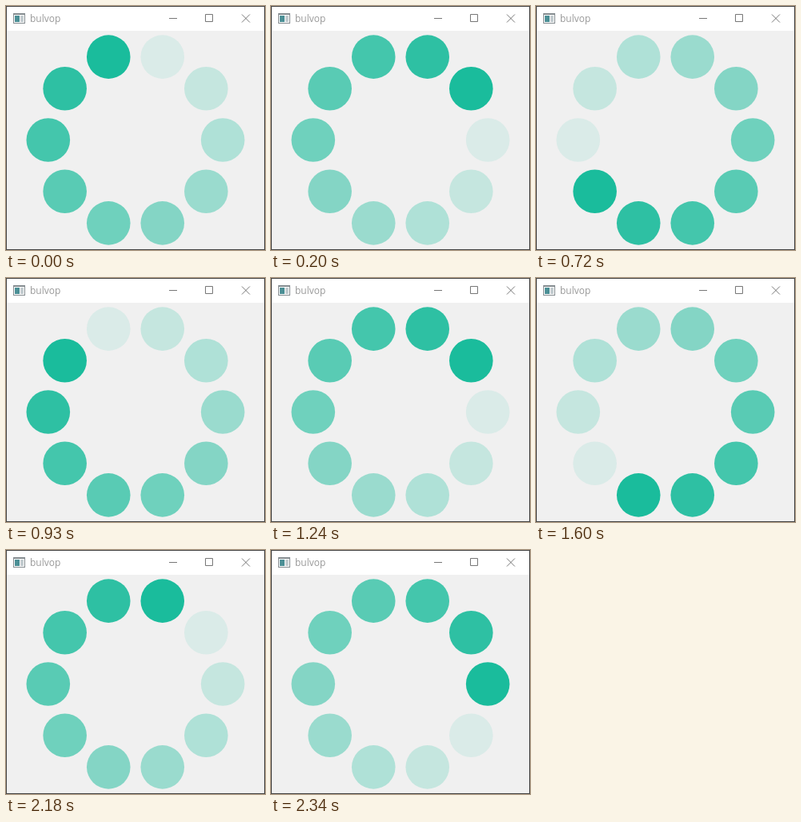
An HTML page for the animation above (2.41 s loop, 324 by 305 pixels).

```html
<!DOCTYPE html>
<html lang="en">
<head>
<meta charset="utf-8">
<title>Loading ring</title>
<style>
  html, body { margin: 0; width: 100%; height: 100%; overflow: hidden; background: #f0f0f0; }
  svg { display: block; width: 324px; height: 305px; }
  text { font: 12px "Open Sans", "Noto Sans", sans-serif; fill: #999; }
  .controls { fill: none; stroke: #777; }
  #ring { fill: #1abc9c; }
</style>
</head>
<body>
<svg viewBox="0 0 324 305">
  <rect width="324" height="305" fill="#444"/>
  <rect x="1" y="1" width="322" height="303" fill="#f0f0f0"/>
  <rect x="1" y="1" width="322" height="30" fill="#fff"/>

  <g shape-rendering="crispEdges">
    <rect x="9" y="9" width="15" height="13" fill="#858c90"/>
    <rect x="10" y="11" width="13" height="10" fill="#fff"/>
    <rect x="11" y="12" width="6" height="8" fill="#4b8f95"/>
    <rect x="18" y="12" width="4" height="8" fill="#c3ccd0"/>
  </g>
  <text x="30" y="20">bulvop</text>

  <g class="controls">
    <path d="M204 15.5h10M249.5 10.5h9v9h-9z"/>
    <path d="M295 10.5l10 10M305 10.5l-10 10"/>
  </g>

  <g id="ring"></g>
</svg>
<script>
  const COUNT = 10, LOOP = 2410, FIRST = 7;
  const CENTER = { x: 162, y: 167.5 }, OUTER = 136.5;
  const DOT = OUTER / 5, RADIUS = OUTER - DOT;
  // Moments (ms) when the brightest dot moves one place clockwise.
  const STEPS = [60, 200, 270, 420, 490, 560, 720, 790, 930, 1000, 1080, 1240,
    1300, 1440, 1520, 1600, 1740, 1810, 1960, 2040, 2180, 2260, 2340];

  const ring = document.getElementById('ring');
  const dots = Array.from({ length: COUNT }, (_, i) => {
    const angle = i * 2 * Math.PI / COUNT;
    const dot = document.createElementNS('http://www.w3.org/2000/svg', 'circle');
    dot.setAttribute('cx', CENTER.x + RADIUS * Math.cos(angle));
    dot.setAttribute('cy', CENTER.y + RADIUS * Math.sin(angle));
    dot.setAttribute('r', DOT);
    return ring.appendChild(dot);
  });

  function draw(time) {
    const head = FIRST + STEPS.filter(t => t <= time).length;
    dots.forEach((dot, i) => {
      const lag = (head - i + COUNT) % COUNT;
      dot.setAttribute('fill-opacity', 1 - lag / COUNT);
    });
  }

  const start = performance.now();
  function tick() {
    draw((performance.now() - start) % LOOP);
    requestAnimationFrame(tick);
  }
  tick();
</script>
</body>
</html>
```
